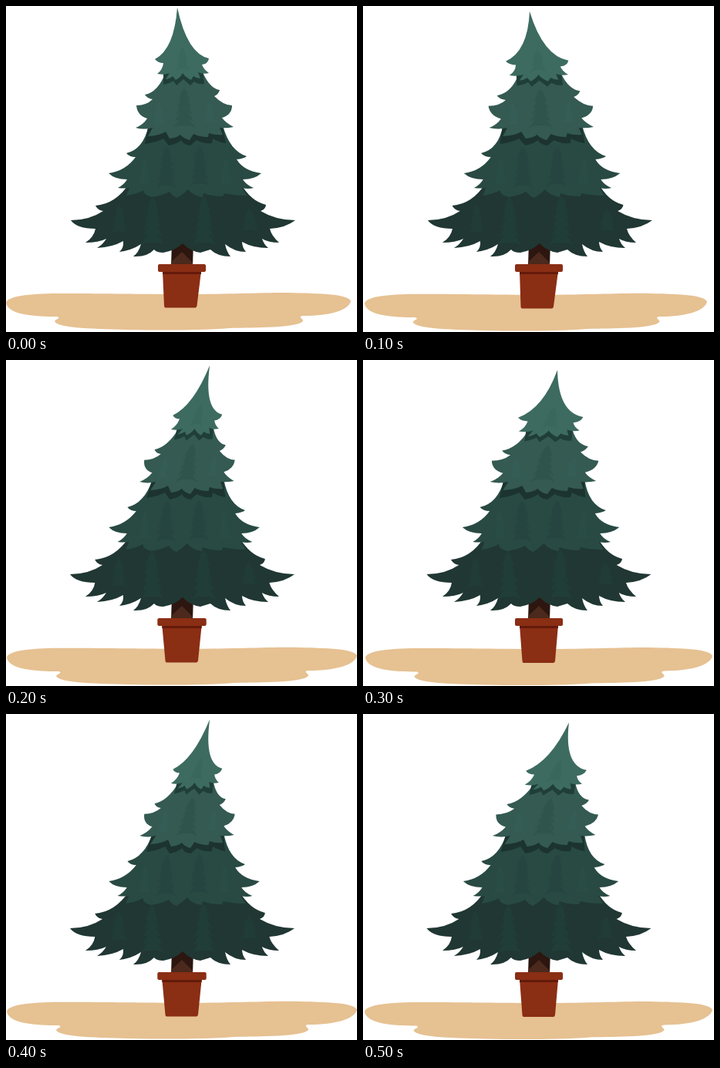
These frames come from a looping animation (455 px wide and 423 px high, 0.6 s). An HTML page:

```html
<!DOCTYPE html>
<html lang="en">
<head>
<meta charset="utf-8">
<title>Swaying fir</title>
<style>
html, body { margin: 0; width: 100%; height: 100%; overflow: hidden; background: #fff; }
svg { display: block; width: 100vw; height: 100vh; }
</style>
</head>
<body>
<svg id="stage" viewBox="0 0 455 423" preserveAspectRatio="none"></svg>
<script>
const STEP = 100;

// bend: sideways pull of the tip, drop: how far the tip sinks, swell: widening of the crown
const still = { bend: 0, drop: 0, swell: 0, shift: 0, ground: [0, 447, 0], pot: [0, 0, 0] };
const dip = { bend: -4, drop: 5, swell: 0.16, shift: 0, ground: [2, 446, 1], pot: [0, -0.5, 1] };
const lean = { bend: 42, drop: 5, swell: -0.09, shift: -1, ground: [1, 455, 1], pot: [0.7, 1.5, 1] };
const squash = { bend: 34, drop: 11, swell: 0.2, shift: -1.5, ground: [3, 453, 1.5], pot: [0, 1.5, 1.5] };
const rise = { bend: 48, drop: 9, swell: 0.12, shift: -1.5, ground: [2, 453, 1.5], pot: [0, 1.5, 1.5] };
const poses = [still, dip, lean, squash, lean, rise];

const stage = document.getElementById("stage");
const parts = [];

function add(fill, d, warp) {
  const el = document.createElementNS("http://www.w3.org/2000/svg", "path");
  el.setAttribute("fill", fill);
  stage.append(el);
  parts.push({ el, d, warp });
}

const ramp = (y, end, span, power) => Math.pow(Math.max(0, (end - y) / span), power);

function sway(x, y, p) {
  const width = 1 + p.swell * ramp(y, 278, 209, 1.6);
  const slide = p.shift * Math.min(1, ramp(y, 306, 25, 1));
  return [
    230 + (x - 230) * width + p.bend * ramp(y, 217, 215, 1.85) + slide,
    y + p.drop * ramp(y, 160, 158, 1.15)
  ];
}

function spread(x, y, p) {
  const [left, right, down] = p.ground;
  return [left + x * (right - left) / 447, y + down * (y > 395 ? 1 : 0.7)];
}

function potWarp(x, y, p) {
  const [rim, foot, down] = p.pot;
  if (y > 380) return [x + foot, y + down];
  return [x + Math.sign(x - 228) * rim, y];
}

// A small fir silhouette with drooping teeth
function fir(fill, cx, top, bottom, half, teeth) {
  const left = [], right = [];
  for (let i = 1; i <= teeth; i++) {
    const k = i / teeth, y = top + (bottom - top) * k, w = half * (0.35 + 0.65 * k);
    left.push(`${cx - w} ${y}`, `${cx - w * 0.5} ${y - 3}`);
    right.unshift(`${cx + w * 0.5} ${y - 3}`, `${cx + w} ${y}`);
  }
  add(fill, `M${cx} ${top}L${left.join(" ")} ${right.join(" ")}Z`, sway);
}

// Ground, pot and trunk
add("#e6c192", "M0 385C3 375 38 373 72 373C135 373 170 374 228 374C295 374 320 372 365 372C410 373 444 374 447 383C444 395 420 402 385 402C377 403 386 406 385 409C376 418 325 417 290 418C250 421 200 421 155 420C105 419 66 417 63 409C65 406 72 405 66 403C38 403 2 401 0 385Z", spread);
add("#2c160f", "M215 306L243 306L242 337L214 337Z", sway);
add("#4b291c", "M214 336L214 332L228 319L242 333L242 336Z", sway);
add("#8a2e14", "M203 344L253 344L247.500 389Q247 391.500 245 391.500L207 391.500Q205 391.500 205 389Z", potWarp);
add("#651a0b", "M203 345L253 345L253 348L203 348Z", potWarp);
add("#8a2e14", "M199 335L257 335Q259 335 259 337L259 343Q259 345 257 345L199 345Q197 345 197 343L197 337Q197 335 199 335Z", potWarp);

// Lowest tier
add("#203733", "M160 230Q142 257 116 259Q119 265 126 266Q108 278 84 278Q92 289 116 289Q114 300 103 307Q120 307 130 302Q126 309 118 314Q138 313 152 305Q153 314 147 319Q163 317 175 309Q172 320 165 325Q183 326 192 316Q195 320 204 320Q220 317 229 308Q238 318 252 320L265 316Q274 325 291 325Q286 319 284 309Q296 319 311 319Q306 313 306 306Q320 314 340 314Q334 309 332 302Q340 307 354 307Q344 298 342 289Q362 288 375 278Q350 278 330 266Q337 263 337 258Q317 253 304 230Z", sway);
fir("#213b36", 147, 256, 296, 12, 5);
fir("#213d38", 190, 248, 310, 15, 6);
fir("#213d38", 257, 246, 310, 15, 6);
fir("#213b36", 316, 262, 294, 13, 4);

// Third tier
add("#284a43", "M185 155Q178 186 156 191Q160 196 168 196Q155 214 133 217Q141 225 157 225Q153 232 145 236Q153 237 160 236L156 246Q170 244 178 239Q178 245 189 248Q202 246 212 241Q215 246 222 249Q230 244 236 238Q242 246 255 248L256 243Q266 247 281 247L283 243Q295 246 312 246L306 236Q314 238 321 236Q311 232 307 225Q322 225 331 217Q308 214 299 199Q308 198 312 195Q290 188 281 155Z", sway);
fir("#264540", 208, 182, 236, 13, 6);
fir("#264540", 251, 182, 234, 13, 6);
fir("#294c45", 180, 196, 234, 10, 5);
fir("#294c45", 285, 196, 234, 10, 5);
add("#1c332f", "M184 158L180 179Q195 177 204 172L211 181Q222 179 227 174Q230 180 239 181L247 174Q255 179 267 178L268 172Q276 177 285 178L281 158Z", sway);

// Second tier
add("#345a52", "M207 86Q197 112 180 115Q183 120 190 121Q182 129 169 129Q170 142 183 146Q178 154 168 158Q179 161 190 158L184 169Q200 168 207 163L212 172Q222 171 226 167Q230 172 238 174L243 166Q251 170 262 170L263 165Q272 168 281 167L277 158Q286 159 295 157Q284 151 280 145Q293 141 293 129Q282 129 270 117Q276 114 277 109Q264 107 255 86Z", sway);
fir("#2f544c", 231, 107, 158, 14, 6);
fir("#355d55", 198, 124, 156, 9, 4);
fir("#355d55", 264, 122, 154, 9, 4);
add("#203e38", "M204 84L204 102Q213 100 217 97L221 103L230 95L239 103L244 98Q249 102 257 101L255 84Z", sway);

// Crown
add("#3d6b60", "M222 2Q218 56 193 69Q197 74 204 74Q203 83 196 88Q205 90 212 87L207 95Q213 94 216 91L220 96Q226 93 229 87Q233 93 240 96L243 91Q247 94 252 94L249 86Q256 89 263 87Q256 82 254 76Q262 75 263 68Q235 62 222 2Z", sway);
fir("#3a675c", 229, 54, 84, 9, 4);

function draw(time) {
  const pose = poses[Math.floor(time / STEP) % poses.length];
  for (const { el, d, warp } of parts) {
    el.setAttribute("d", d.replace(/(-?[\d.]+) (-?[\d.]+)/g, (_, x, y) =>
      warp(+x, +y, pose).map(v => v.toFixed(2)).join(" ")));
  }
}

let start;
function tick(now) {
  start ??= now;
  draw(now - start);
  requestAnimationFrame(tick);
}
draw(0);
requestAnimationFrame(tick);
</script>
</body>
</html>
```
